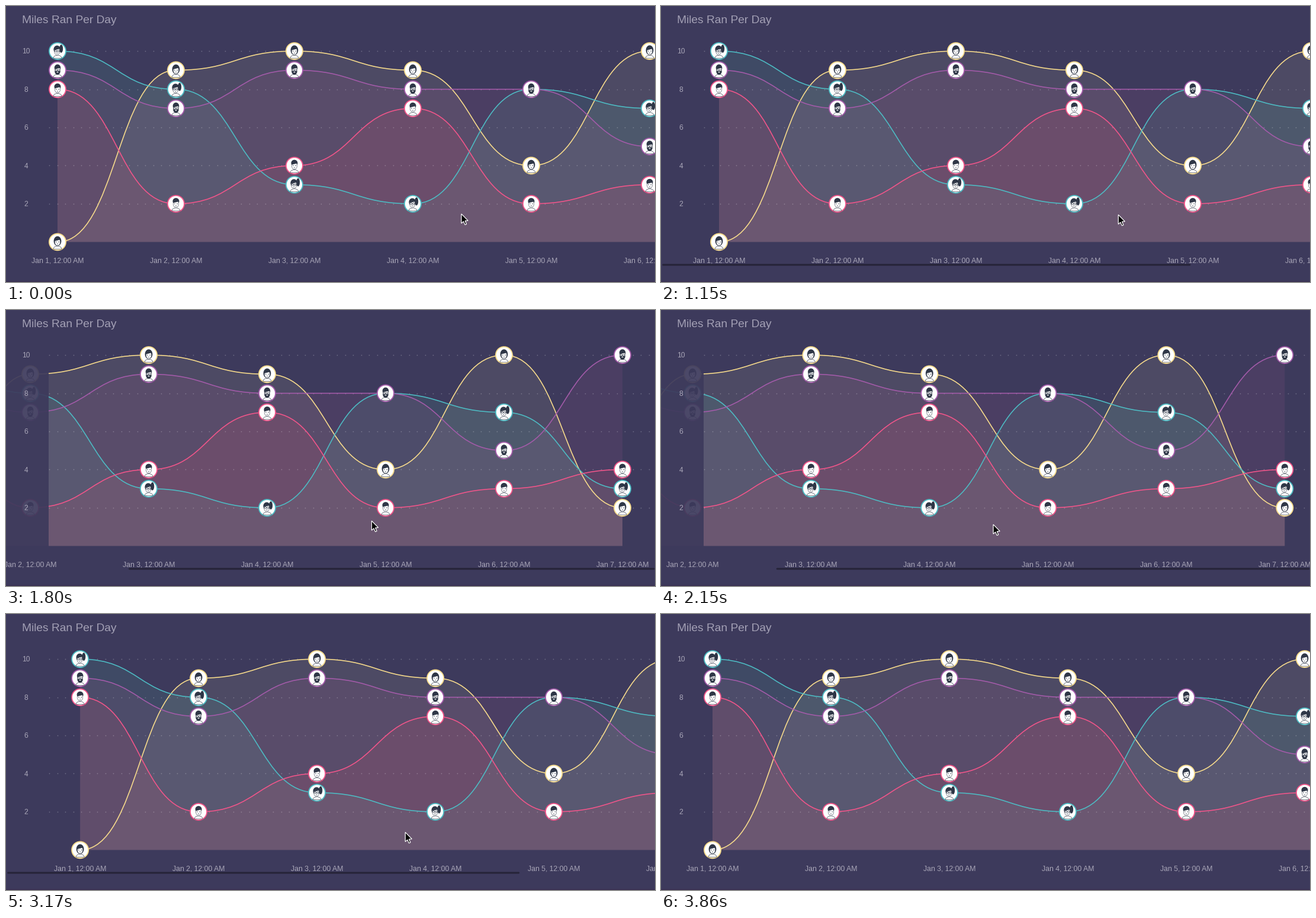
Animation of 1096x466 px, one loop 4.99 s. Source, as a matplotlib script:

```python
import numpy as np
import matplotlib.pyplot as plt
from matplotlib.animation import FuncAnimation
from matplotlib.patches import PathPatch, Rectangle
from matplotlib.path import Path
from matplotlib.transforms import Affine2D

W, H, DPI = 1096, 466, 100
LOOP, STEP = 4990, 10
PX = 72 / DPI

BG, INK, LABEL = "#3D3A5C", "#2E3646", "#A9A6B8"
REST, END = 87, -144          # x of the first day at both scroll limits
DAY, BASE, UNIT = 200, 398.4, 32.23

# line colour, area colour, miles per day
SERIES = [
    ("#F8DC8C", "#DCDCB0", [0, 9, 10, 9, 4, 10, 2]),
    ("#4DBCC4", "#4EBEAA", [10, 8, 3, 2, 8, 7, 3]),
    ("#A45BAA", "#B45F96", [9, 7, 9, 8, 8, 5, 10]),
    ("#F2558A", "#F05573", [8, 2, 4, 7, 2, 3, 4]),
]

plt.rcParams["font.family"] = "Liberation Sans"
plt.rcParams["path.snap"] = False

fig = plt.figure(figsize=(W / DPI, H / DPI), dpi=DPI, facecolor=BG)
ax = fig.add_axes([0, 0, 1, 1])
ax.set_xlim(0, W)
ax.set_ylim(H, 0)
ax.axis("off")

scroll, pointer = Affine2D(), Affine2D()
moving = scroll + ax.transData


# ---------- shapes ----------
def level(v):
    return BASE - UNIT * v


def poly(*pts):
    return Path(list(pts) + [pts[0]], closed=True)


def oval(x, y, rx, ry, start=0, stop=360):
    """Ellipse, or the piece of it cut off by a chord."""
    a = np.radians(np.linspace(start, stop, 28))
    return poly(*zip(x + rx * np.cos(a), y + ry * np.sin(a)))


def patch(path, z, trans=moving, width=0.0, **kw):
    p = PathPatch(path, transform=trans, zorder=z, lw=width * PX, **kw)
    ax.add_patch(p)
    return p


def curve(values):
    """Bezier through the days, level at every point."""
    verts, codes = [(0, level(values[0]))], [Path.MOVETO]
    for i in range(1, len(values)):
        x, y0, y1 = i * DAY, level(values[i - 1]), level(values[i])
        verts += [(x - DAY / 2, y0), (x - DAY / 2, y1), (x, y1)]
        codes += [Path.CURVE4] * 3
    return verts, codes


# ---------- avatars: parts by layer, centred on the origin ----------
def person(hair, extra=(), beard=False, glasses=False, x=0):
    parts = dict(
        body=[oval(0, 12, 7, 5, 180, 360)],
        back=[oval(x, *hair), *extra],
        face=[oval(x, 0, 4.6, 6.3)],
        front=[oval(x, -0.3, 4.8, 6.4, 190, 328)],
        ink=[],
        light=[],
    )
    for side in (-1, 1):
        r = 1.7 if glasses else 0.4
        parts["ink"].append(oval(x + 2.1 * side, 0, r, r * 0.8))
    if beard:
        parts["front"].append(oval(x, 1.6, 4.7, 6.2, 0, 180))
        parts["light"].append(oval(x, 3.4, 1.6, 0.7))
    else:
        parts["ink"].append(Path([(x - 1.2, 3.4), (x + 1.2, 3.4)]))
    return parts


PEOPLE = [
    person(hair=(-1.5, 6.4, 8.2)),
    person(hair=(-2.8, 5.8, 6.6), extra=[oval(6.2, -4, 3, 6.8)],
           glasses=True, x=-0.8),
    person(hair=(-4, 5.3, 5.8), beard=True, glasses=True),
    person(hair=(-4.4, 5.5, 5.4)),
]
# fill and outline width of each layer, bottom to top
STYLES = dict(body=("white", 0.6), back=(INK, 0), face=("white", 0.5),
              front=(INK, 0), ink=("none", 0.7), light=("white", 0))


def place(path, spot):
    return Path(path.vertices + spot, path.codes)


def merged(paths):
    return Path.make_compound_path(*paths)


# ---------- chart ----------
dots = np.linspace(73, 1086, 76)
for v in range(2, 11, 2):
    ax.plot(dots, np.full(dots.size, level(v)), ls="none", marker="o",
            ms=1.7 * PX, mew=0, color="white", alpha=0.27, zorder=2)
    ax.text(34, level(v) + 4.2, str(v), ha="center", color=LABEL,
            fontsize=12 * PX, zorder=9)

layers = {name: [] for name in STYLES}
for n, (color, fill, values) in enumerate(SERIES):
    verts, codes = curve(values)
    last = (len(values) - 1) * DAY
    area = Path(verts + [(last, BASE), (0, BASE), (0, BASE)],
                codes + [Path.LINETO, Path.LINETO, Path.CLOSEPOLY])
    patch(area, 1, fc=fill, ec="none", alpha=0.1 if n == 0 else 0.12)
    patch(Path(verts, codes), 3, width=1.6, fc="none", ec=color)

    # a later series covers an equal point
    spots = [(i * DAY, level(v)) for i, v in enumerate(values)
             if all(s[2][i] != v for s in SERIES[n + 1:])]
    patch(merged([oval(x, y, 14.1, 14.1) for x, y in spots]), 5,
          width=1.8, fc="white", ec=color)
    for name, parts in PEOPLE[n].items():
        layers[name] += [place(p, s) for s in spots for p in parts]

for z, (name, (fill, width)) in enumerate(STYLES.items()):
    patch(merged(layers[name]), 6 + z / 10, width=width, fc=fill,
          ec=INK if width else "none")

for i in range(7):
    ax.text(i * DAY, 433.2, f"Jan {i + 1}, 12:00 AM", ha="center",
            color=LABEL, fontsize=12.2 * PX, transform=moving, zorder=7)

# Veil over whatever scrolls under the axis
ax.add_patch(Rectangle((0, 50), 72, 366, fc=BG, ec="none", alpha=0.93,
                       zorder=8))
ax.add_patch(Rectangle((0, 464.5), W, 1.5, fc="#3A3050", ec="none", zorder=8))
ax.text(27, 29, "Miles Ran Per Day", color="#A3A0B5", fontsize=19.2 * PX,
        zorder=9)

bar, = ax.plot([], [], color="#262438", lw=3 * PX, solid_capstyle="round",
               zorder=9)
arrow = patch(poly((0, 0), (0, 16), (3.6, 12.7), (6.2, 18.4), (8.7, 17.3),
                   (6.2, 11.7), (11.2, 11.4)),
              10, pointer + ax.transData, width=1.2, fc="black", ec="white")


# ---------- motion ----------
def smooth(u):
    return u * u * (3 - 2 * u)


def settle(u):
    return 1 - (1 - u) ** 3


# start, stop, chart x at the stop, easing
MOVES = [
    (0, 190, 97, smooth), (190, 440, REST, settle),
    (760, 1030, 98, smooth), (1265, 1860, -166.5, smooth),
    (1860, 2430, END, settle),
    (2730, 3185, 126, smooth), (3220, 3800, REST, settle),
]
# pointer way points: time, x, y
WAY = np.array([
    (0, 769, 351), (440, 786, 351), (850, 787, 351), (1030, 800, 351),
    (1450, 703, 356), (1800, 617.5, 356), (2430, 516, 367),
    (2730, 516, 367), (3160, 671, 367), (3800, 880, 461),
]).T
TOUCHES = [(60, 440), (850, 2430), (2740, 3220)]


def chart_x(t):
    x = REST
    for start, stop, goal, ease in MOVES:
        x += (goal - x) * ease(np.clip((t - start) / (stop - start), 0, 1))
    return x


def bar_span(x):
    """Scroll bar ends; it shrinks when the chart is pulled past a limit."""
    full, track = 902, 1092
    part = np.clip((REST - x) / (REST - END), 0, 1)
    start = 2 + part * (track - full)
    return start + max(END - x, 0), start + full - max(x - REST, 0)


def draw(frame):
    t = frame * STEP
    x = chart_x(t)
    scroll.clear().translate(x, 0)
    pointer.clear().translate(*(np.interp(t, WAY[0], c) for c in WAY[1:]))
    arrow.set_visible(t < 3860)
    left, right = bar_span(x)
    bar.set_data([left + 1.5, right], [437, 437])
    bar.set_visible(any(a <= t < b for a, b in TOUCHES))
    return bar, arrow


anim = FuncAnimation(fig, draw, frames=LOOP // STEP, interval=STEP,
                     repeat=True, repeat_delay=0, blit=False)
plt.show()
```
